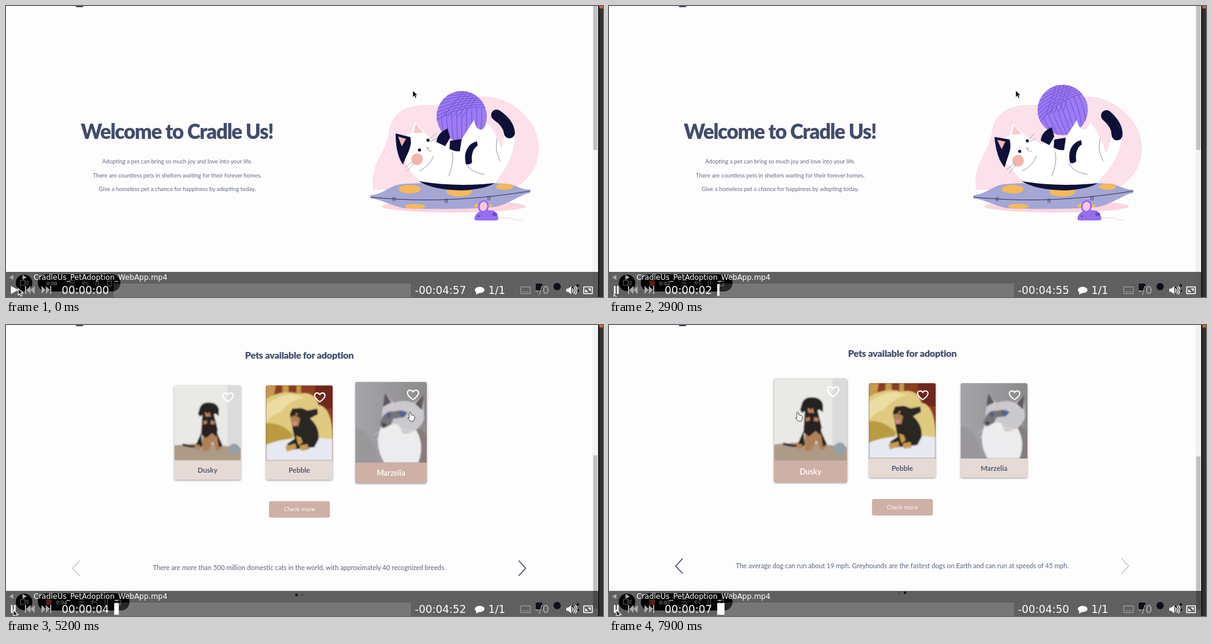
An HTML page that plays this animation: 976x475 px, repeating every 8 s.

```html
<!DOCTYPE html>
<html lang="en">
<head>
<meta charset="utf-8">
<title>Pet adoption screen recording</title>
<style>
  html, body { margin: 0; width: 100%; height: 100%; overflow: hidden; background: #fefdfe; }
  svg { display: block; width: 976px; height: 475px; }
  text { font-family: Lato, sans-serif; fill: #404d6b; }
  .mid { text-anchor: middle; }
  .body { font-size: 9.4px; fill: #626b84; }
  .fact { font-size: 10.75px; fill: #59637f; }
  .name { font-size: 11.6px; font-weight: 600; }
  .player text { font: 17.3px "DejaVu Sans", sans-serif; fill: #fff; }
  .player .file { font-size: 12px; }
  .line { fill: none; stroke-linecap: round; stroke-linejoin: round; }
</style>
</head>
<body>
<svg viewBox="0 0 976 475">
  <defs>
    <clipPath id="ballClip"><circle cx="745" cy="180" r="41"/></clipPath>
    <clipPath id="photoClip"><path d="M0 123V3Q0 0 3 0H106Q109 0 109 3V123Z"/></clipPath>
    <clipPath id="factClip"><rect x="140" y="830" width="680" height="50"/></clipPath>
    <filter id="shadow" x="-10%" y="-10%" width="120%" height="120%">
      <feDropShadow dx="0" dy="1.2" stdDeviation="1.6" flood-color="#555" flood-opacity=".6"/>
    </filter>
    <filter id="soft"><feGaussianBlur stdDeviation="1"/></filter>
    <linearGradient id="catBack"><stop stop-color="#a5a4a8"/><stop offset="1" stop-color="#8d8a8d"/></linearGradient>
    <path id="arrow" d="M0 0V11L2.6 8.6 4.3 12.5 6.3 11.6 4.6 7.8H8Z"/>
    <path id="heart" d="M0 7C-4 4-8.5 1-8.5-3.2C-8.5-8-2.5-9 0-4.8C2.5-9 8.5-8 8.5-3.2C8.5 1 4 4 0 7Z"/>
  </defs>

  <rect width="976" height="475" fill="#fefdfe"/>
  <g id="page">
    <text class="mid" x="279.5" y="217" font-size="33" font-weight="900" letter-spacing="-1.2">Welcome to Cradle Us!</text>
    <text class="mid body" x="280" y="257">Adopting a pet can bring so much joy and love into your life.</text>
    <text class="mid body" x="280" y="279.5">There are countless pets in shelters waiting for their forever homes.</text>
    <text class="mid body" x="280" y="302">Give a homeless pet a chance for happiness by adopting today.</text>

    <path fill="#fce0ea" d="M600 300C594 255 622 240 626 205C630 172 660 158 700 162C735 164 755 146 787 148C820 150 848 172 862 196C875 220 873 250 862 268C850 287 835 296 825 300Z"/>
    <ellipse cx="732" cy="327" rx="118" ry="10" fill="#fbd5df"/>
    <path fill="#a4a6d4" d="M596 309C620 306 625 294 645 291C690 287 780 288 815 290C832 290 840 300 857 300V305C840 308 825 322 800 328C760 332 690 332 650 330C630 326 615 316 596 314Z"/>
    <g fill="#f5b958">
      <ellipse cx="660" cy="299" rx="18" ry="7"/><ellipse cx="741" cy="303" rx="21" ry="8"/>
      <ellipse cx="815" cy="295" rx="14" ry="5"/><ellipse cx="669" cy="327" rx="17" ry="4"/>
      <ellipse cx="780" cy="326" rx="15" ry="4"/>
    </g>
    <path class="line" stroke="#25254a" stroke-width=".9" d="M596 312C660 318 740 321 857 302M633 312v6m3-6v6M718 315v6m3-6v6M788 311v6m3-6v6"/>

    <g id="ball">
      <circle cx="745" cy="180" r="41" fill="#9d7bf5"/>
      <g id="yarn" class="line" stroke="#7858d3" stroke-width="1.2" clip-path="url(#ballClip)"></g>
    </g>
    <g id="tail" class="line" stroke-width="18">
      <path stroke="#fff" d="M823 215Q819 250 798 275"/>
      <path stroke="#0e1039" d="M802 178C814 186 822 196 823 207"/>
    </g>
    <path fill="#fff" d="M650 235C660 215 690 212 705 225L742 222L765 186C769 207 782 205 786 191C793 194 797 205 803 215C816 240 817 275 797 290Q737 300 680 287C660 275 650 255 650 235Z"/>
    <path fill="#0e1039" d="M675 286Q737 296 799 289Q784 299 745 301Q697 300 675 286Z"/>
    <path class="line" stroke="#77778c" stroke-width=".8" d="M676 269Q692 262 699 245M729 238C733 252 728 266 724 277M752 257C757 268 768 272 782 275M803 216Q798 236 808 253"/>
    <g id="paws" fill="#0e1039">
      <path d="M722 200C710 205 704 213 704 222L718 229L726 215Z"/>
      <path d="M726 220L745 217L742 237Q733 238 725 233Z"/>
      <path d="M770 221C755 224 747 240 752 258Q758 260 762 255C760 242 764 232 771 228Z"/>
    </g>
    <g id="head">
      <ellipse cx="672" cy="233" rx="29" ry="27" fill="#fff"/>
      <path fill="#fff" d="M660 214L669 189L687 209Z"/>
      <path fill="#f9c9cd" d="M666 207L670 192L682 207Z"/>
      <path fill="#0e1039" d="M637 208L661 214C665 230 655 242 649 259C640 246 637 228 637 208Z"/>
      <path fill="#f5b4ae" d="M641 213L654 217L647 229Z"/>
      <circle cx="672" cy="250" r="9.5" fill="#f4b5ad"/>
      <g fill="#15152e"><circle cx="676" cy="235" r="2.6"/><circle cx="690" cy="219" r="2.6"/></g>
      <path fill="#eea4a4" d="M686 230L692 231L690 235Z"/>
      <path class="line" stroke="#8b8b9c" stroke-width=".7" d="M690 235Q691 239 696 236M691 218L703 208M694 221L704 216M667 253L652 263M668 256L656 269"/>
    </g>

    <path class="line" stroke="#dedbe0" d="M804 347Q820 344 830 348T845 347"/>
    <path fill="#946df0" d="M766 347C766 336 780 331 797 334Q804 338 805 347Q805 350 801 350H769Q766 350 766 347Z"/>
    <ellipse cx="780.5" cy="327" rx="7.5" ry="9" fill="#f7c8dd" stroke="#946df0" stroke-width="2.8" transform="rotate(12 780 327)"/>
    <ellipse cx="799" cy="340" rx="4" ry="3" fill="#7045d2"/>
    <circle cx="773" cy="343" r="1" fill="#222"/>

    <text class="mid" x="479.5" y="512" font-size="15.5" font-weight="900" letter-spacing="-.3">Pets available for adoption</text>
    <g id="cards"></g>
    <rect x="430" y="744.5" width="99.5" height="27" rx="3" fill="#cfb0a6"/>
    <text class="mid" x="479.5" y="761" style="font:9.1px 'Open Sans',sans-serif;fill:#fff">Check more</text>
    <g class="line" stroke-width="1.6">
      <path id="back" d="M120 842L109 854L120 866"/>
      <path id="next" d="M838.5 842L849.5 854L838.5 866"/>
    </g>
    <g clip-path="url(#factClip)"><g id="facts">
      <text class="mid fact" x="479.5" y="857.5">There are more than 500 million domestic cats in the world, with approximately 40 recognized breeds.</text>
      <text class="mid fact" x="1159.5" y="857.5">The average dog can run about 19 mph. Greyhounds are the fastest dogs on Earth and can run at speeds of 45 mph.</text>
    </g></g>
    <circle id="dot0" cx="475" cy="897.5" r="2.2"/>
    <circle id="dot1" cx="484" cy="897.5" r="2.2"/>
  </g>

  <rect width="960" height="12" fill="#fefdfe" fill-opacity=".88"/>
  <path fill="#3c4866" d="M114 0H127Q126 2 124 2H117Q114 2 114 0Z"/>
  <rect x="959" width="9" height="475" fill="#f3f2f3"/>
  <rect id="thumb" x="960" width="7" height="250" fill="#c2c1c2"/>
  <rect x="968" width="8" height="475" fill="#303033"/>
  <rect x="968" width="1.5" height="475" fill="#0c0c0c"/>
  <rect x="970" width="6" height="4" fill="#d4622c"/>

  <g id="pointer">
    <use id="pageArrow" href="#arrow" fill="#111" stroke="#fff" stroke-width=".6"/>
    <path id="hand" d="M-3 5V-4Q-1.5-6 0-4V0Q2-1 3 .5Q5 0 6 2V6L4 10H-1L-5 5Q-5 3-3 5Z" fill="#fff" stroke="#333" stroke-width=".9"/>
  </g>

  <g fill="#252c48">
    <rect x="866" y="453" width="11" height="11" rx="2"/><circle cx="901" cy="458" r="6"/>
    <path d="M927 460L935 456M927 460L935 465" stroke="#252c48"/>
    <circle cx="927" cy="460" r="2"/><circle cx="935" cy="456" r="2"/><circle cx="935" cy="465" r="2"/>
  </g>
  <g id="recorder">
    <circle cx="29.5" cy="452" r="13.5" fill="#080808"/>
    <path d="M24 448h7v8h-7zM32 451l4-2v6l-4-2" class="line" stroke="#fff"/>
    <rect id="pill" x="52" y="438" height="28" rx="14" fill="#080808"/>
    <rect id="record" x="66" y="448" width="9" height="9" rx="1" fill="#ee5139"/>
    <text id="elapsed" class="mid" y="455.5" style="font:bold 9px 'Open Sans',sans-serif;fill:#fff"></text>
    <path id="tools" class="line" stroke="#bbb" stroke-width="1.3" d="M119 448h8m-8 4h8m-8 4h8M140 452l3-3m-3 3l3 3m-3-3h6q3 0 3 4M162 448v8m4-8v8M180 449h8m-7 0v8h6v-8"/>
  </g>

  <g class="player">
    <rect y="434" width="968" height="41" fill-opacity=".62"/>
    <rect x="176" y="453" width="486" height="22" fill="#fff" fill-opacity=".14"/>
    <rect id="progress" x="177" y="454" height="19" fill="#fff"/>
    <g fill="#aaa">
      <path d="M12 439V447L5 443Z"/><path d="M27 439V447L34 443Z"/>
      <path d="M31 457h2v13h-2zM40 457v13l-7-6.5zM47 457v13l-7-6.5z"/>
      <path d="M58 457v13l7-6.5zM65 457v13l7-6.5zM72 457h2v13h-2z"/>
    </g>
    <text class="file" x="45" y="447">CradleUs_PetAdoption_WebApp.mp4</text>
    <path id="play" fill="#fff" d="M8 457V470L20 463.5Z"/>
    <path id="pause" fill="#fff" d="M8 457h2.7v13H8zM13 457h2.7v13H13z"/>
    <text id="clock" x="91" y="470"></text>
    <text id="remaining" x="668.5" y="470"></text>
    <path fill="#fff" d="M774 458.5C785 458.5 785 468.5 774 468.5L768 471L769 467.5C764 464 767 458.5 774 458.5Z"/>
    <text x="788.5" y="470">1/1</text>
    <path class="line" stroke="#aaa" d="M842 458.5h15v11h-15zM845 466.5h3m2 0h4"/>
    <text x="865" y="470" style="fill:#aaa">-/0</text>
    <path fill="#fff" d="M916 461.5h3l5-4v13l-5-4h-3z"/>
    <path class="line" stroke="#fff" stroke-width="1.3" d="M926 461q2 3 0 6M928.5 459q4 5 0 10M931 457.5q5 6.5 0 13"/>
    <path class="line" stroke="#fff" stroke-width="1.6" d="M944.5 458.5h14v11h-14z"/>
    <path fill="#fff" d="M947 467v-5l5 5zM956 461v5l-5-5z"/>
  </g>
  <use id="playerArrow" href="#arrow" fill="#222" stroke="#fff" stroke-width="1.1"/>
</svg>

<script>
const $ = id => document.getElementById(id);
const set = (id, attributes) => {
  for (const key in attributes) $(id).setAttribute(key, attributes[key]);
};
const show = (id, visible) => set(id, { visibility: visible ? 'visible' : 'hidden' });
const clamp = x => Math.max(0, Math.min(1, x));
const ramp = (t, start, duration) => {
  const x = clamp((t - start) / duration);
  return x * x * (3 - 2 * x);
};

// Yarn strands: bowed verticals below, a fan of diagonals above.
let strands = '';
for (let i = -5; i <= 5; i++) strands += `<path d="M${745 + i * 8} 165Q${745 + i * 9} 195 ${745 + i * 6} 224"/>`;
strands += '<path fill="#9d7bf5" stroke="none" d="M700 135H790V166Q745 160 704 186Z"/>';
for (let i = 0; i < 8; i++) strands += `<path d="M704 ${186 - i * 6}Q745 ${160 - i * 3} 788 ${166 - i * 4}"/>`;
for (let i = 0; i < 5; i++) strands += `<path d="M${715 + i * 8} 180L${748 + i * 7} 140"/>`;
$('yarn').innerHTML = strands;

const photos = [
  `<rect width="109" height="123" fill="#e9e9e6"/><rect x="87" width="22" height="123" fill="#dadbdc"/>
   <path fill="#ad9a87" d="M0 98L45 94L109 102V123H0Z"/>
   <path class="line" stroke="#2b2524" stroke-width="3.500" d="M44 98Q30 102 15 97"/>
   <path fill="#b08058" d="M46 76H70L78 103L70 107L63 92L56 107H46Z"/>
   <path fill="#262122" d="M46 48Q55 42 65 48L71 72L69 84L62 78L52 86L44 80ZM44 78L46 98L38 104L36 96ZM69 76L79 98L73 101Z"/>
   <path fill="#262122" d="M42 36Q46 27 57 28Q70 28 73 39L73 50L67 46Q57 55 48 47L42 51L39 47Z"/>
   <path fill="#b58256" d="M50 44h8l2 7h-9zM47 59l6-2 1 5-6 2zM60 57l7 2-2 5-6-1zM34 96l9 2-3 7-7-2z"/>
   <path fill="#111" d="M52 43h5l-2 4z"/><circle cx="98" cy="104" r="9" fill="#98a0a7"/>`,
  `<rect width="109" height="123" fill="#8c3e20"/><path fill="#c79a48" d="M0 0H16L12 24H0zM27 0H37V20H27zM50 0H57V20H50z"/><path fill="#70261c" d="M80 0H109V38H80z"/>
   <path fill="#dfca80" d="M0 22Q28 6 53 14Q79 8 86 32Q110 36 109 97H0Z"/>
   <path fill="#ba9b42" d="M0 62Q24 60 44 80L38 97H0Z"/>
   <path fill="#ecdda2" d="M16 22Q38 8 62 20Q40 24 24 44Q6 48 0 62V30Z"/>
   <path fill="#e6e9f2" d="M0 97Q42 80 109 88V123H0Z"/>
   <path fill="#2b2722" d="M39 47L43 38L58 37L68 41L84 38L85 47L72 54Q88 68 86 88L79 101L42 105L34 96L47 87Q43 71 43 66Z"/>
   <path fill="#c99a50" d="M49 82l8 3 3 8-7 5zM32 99l16-4 2 8-16 5zM55 98l13-2 2 9-13 2z"/>
   <path fill="#a98252" d="M39 52l9-3 8 5-3 13-9-2z"/><path fill="#d98a8a" d="M43 59l9 1-4 7-4-1z"/><circle cx="50" cy="47" r="1.500" fill="#d9a050"/>`,
  `<rect width="109" height="123" fill="url(#catBack)"/><path fill="#9a989b" d="M0 72Q20 65 37 123H0Z"/>
   <path fill="#857d7a" d="M78 74Q100 62 109 84V123H84Z"/>
   <path fill="#ececee" d="M42 63Q26 92 44 123H96Q108 92 88 66Z"/>
   <path fill="#cbc9cd" d="M41 45L45 19L59 32Q75 26 89 32L103 20L105 56Q98 76 76 79Q54 80 39 66Z"/>
   <path fill="#5d585d" d="M42 38L45 17L55 31ZM91 33L104 19L102 43Z"/>
   <path fill="#77737a" d="M41 54Q48 43 58 45Q70 41 80 47L74 54L58 56L54 66L42 71L37 65Z"/>
   <path fill="#ececee" d="M45 71Q56 61 66 65L74 82L44 88Z"/>
   <g fill="#4f69b4" stroke="#33364e" stroke-width=".8"><ellipse cx="51" cy="51" rx="2.500" ry="3"/><ellipse cx="72" cy="48" rx="4.500" ry="3.300"/></g>
   <path fill="#423b40" d="M40 62l8 2-5 5z"/>
   <path class="line" stroke="#f5f5f5" stroke-width=".6" d="M45 70L29 81M46 72L32 89M58 70L90 76M58 72L87 86"/>`
];
const names = ['Dusky', 'Pebble', 'Marzelia'];
$('cards').innerHTML = photos.map((photo, i) => `
  <g id="card${i}">
    <g filter="url(#shadow)"><rect id="label${i}" width="109" height="154" rx="3"/></g>
    <g clip-path="url(#photoClip)">${photo.match(/<rect.*?>/)[0]}<g filter="url(#soft)">${photo}</g></g>
    <use href="#heart" x="88" y="20" class="line" stroke="#fff" stroke-width="2"/>
    <text id="name${i}" class="mid name" x="54.5" y="142.500">${names[i]}</text>
  </g>`).join('');

// When the pointer enters and leaves each card.
const hovers = [[7010, 9000], [6090, 6930], [4880, 6068]];

const scrollAt = t => [[2950, 151.5], [3900, 151.5], [4750, 157.5]]
  .reduce((sum, [start, step]) => sum + (t > start ? step * (1 - Math.exp((start - t) / 118)) : 0), 0);

const pad = n => String(n).padStart(2, '0');
const clockText = seconds => `00:${pad(Math.floor(seconds / 60))}:${pad(Math.floor(seconds % 60))}`;

function drawPage(t, video) {
  const scroll = scrollAt(t);
  set('page', { transform: `translate(0 ${-scroll})` });
  set('thumb', { y: scroll * 0.4985 - 15 });

  const kick = (1 - Math.cos(2 * Math.PI * video / 0.98)) / 2;
  set('ball', { transform: `translate(${-5 * kick} ${-16 * kick}) rotate(${-30 * kick} 745 180)` });
  set('head', { transform: `translate(${-5 * kick} ${4 * kick}) rotate(${-8 * kick} 672 250)` });
  set('tail', { transform: `rotate(${11 * kick} 800 270)` });
  set('paws', { transform: `translate(${3 * kick} ${-3 * kick})` });

  let hovering = false;
  hovers.forEach(([enter, leave], i) => {
    const over = t >= enter && t < leave;
    const scale = 1 + 0.1 * (ramp(t, enter, 500) - ramp(t, leave, 500));
    hovering ||= over;
    set('card' + i, { transform: `translate(${329.5 + 150 * i} 632.5) scale(${scale}) translate(-54.5 -77)` });
    set('label' + i, { fill: over ? '#cfb0a6' : '#e6dad5' });
    $('name' + i).style.fill = over ? '#fff' : '#404d6b';
  });

  const slide = ramp(t, 5800, 400);
  const second = slide > 0.5;
  const dark = '#3d4a6b', pale = '#c5c7d0';
  set('facts', { transform: `translate(${-680 * slide} 0)` });
  set('back', { stroke: second ? dark : pale });
  set('next', { stroke: second ? pale : dark });
  set('dot0', { fill: second ? '#d5d5dc' : '#353a50' });
  set('dot1', { fill: second ? '#353a50' : '#d5d5dc' });

  const toMiddle = ramp(t, 5990, 130), toLeft = ramp(t, 6700, 500);
  const x = 665 - 3 * ramp(t, 4750, 200) - 149 * toMiddle - 203 * toLeft;
  const y = 138 + 9 * ramp(t, 2800, 2200) + 5 * (toMiddle - toLeft);
  set('pointer', { transform: `translate(${x} ${y})` });
  show('pageArrow', !hovering);
  show('hand', hovering);
}

function drawPlayer(t, video) {
  const playing = t >= 400, recording = video >= 0.5;
  show('play', !playing);
  show('pause', playing);
  $('clock').textContent = clockText(video);
  $('remaining').textContent = '-' + clockText(297.35 - video);
  set('progress', { width: video / 297.35 * 486 });

  set('pill', { width: recording ? 150 : 135 });
  set('elapsed', { x: recording ? 91 : 75 });
  set('tools', { transform: `translate(${recording ? 0 : -15} 0)` });
  show('record', recording);
  $('elapsed').textContent = `0:${pad(Math.floor(video))}`;

  const [x, y] = t < 100 ? [20, 461] : t < 400 ? [37, 462] : t < 600 ? [12, 462] : t < 3400 ? [8, 471] : [12, 465];
  set('playerArrow', { transform: `translate(${x} ${y})` });
}

function draw(now) {
  const t = Math.floor(now % 8000 / 100) * 100;
  const video = Math.max(0, t - 650) / 1000;
  drawPage(t, video);
  drawPlayer(t, video);
  requestAnimationFrame(draw);
}
draw(performance.now());
</script>
</body>
</html>
```
